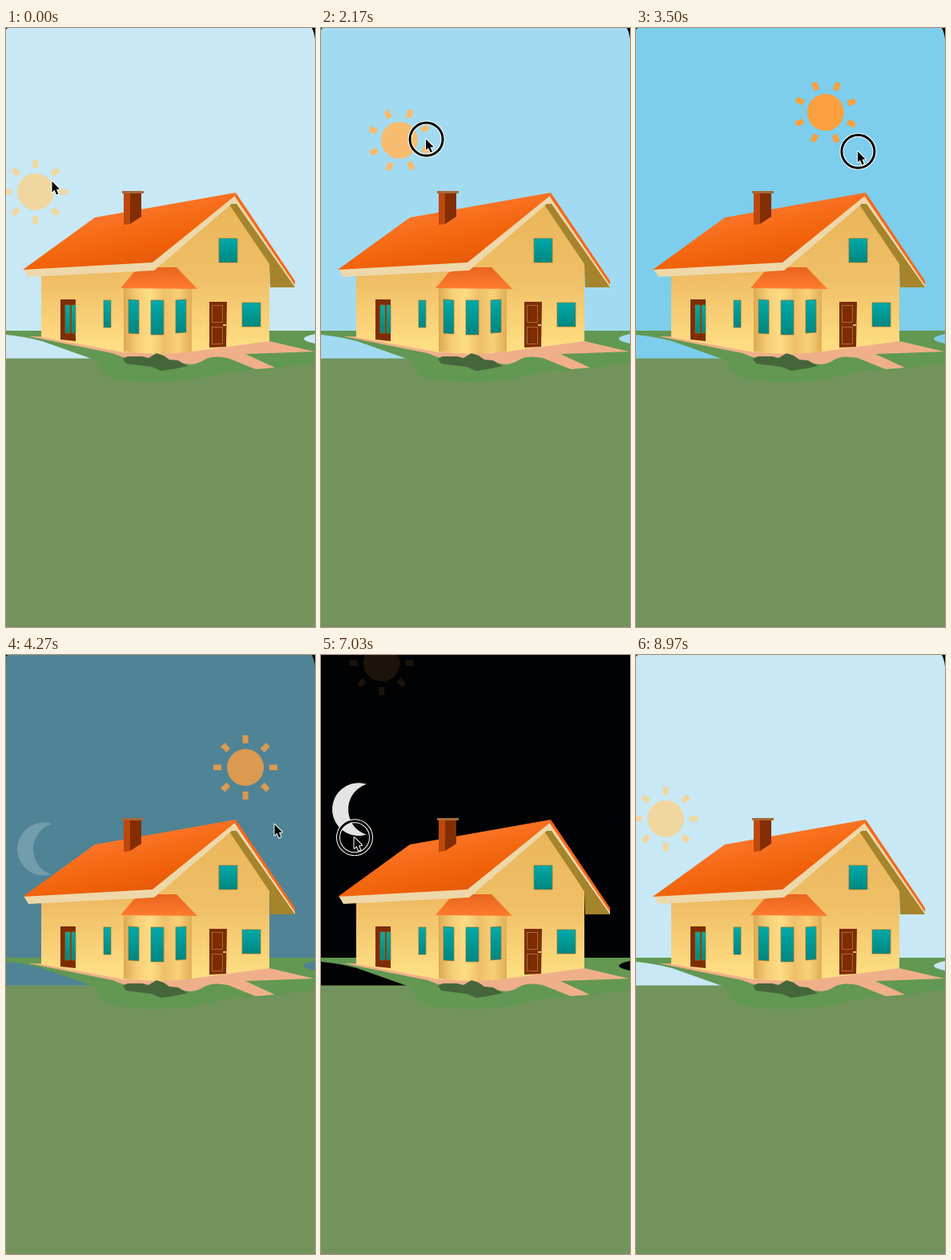
Write an HTML page with a canvas that moves like this. It is 386 by 746 pixels and loops after 9010 ms.

```html
<!DOCTYPE html>
<html lang="en">
<head>
<meta charset="utf-8">
<title>Day and night</title>
<style>
html, body { margin: 0; width: 100%; height: 100%; overflow: hidden; background: #000; }
canvas { display: block; width: 100%; height: 100%; }
</style>
</head>
<body>
<canvas id="stage" width="386" height="746"></canvas>
<script>
const W = 386, H = 746, LOOP = 9010;
const SKY_PALE = [200, 232, 245], SKY_BLUE = [124, 206, 236];
const SUN_PALE = [240, 215, 160], SUN_WARM = [254, 160, 64];
const ctx = document.getElementById('stage').getContext('2d');

const clamp = v => Math.min(1, Math.max(0, v));
const span = (t, a, b) => clamp((t - a) / (b - a));
const smooth = u => u * u * (3 - 2 * u);
const mix = (a, b, u) => a.map((v, i) => v + (b[i] - v) * u);
const rgb = c => `rgb(${c.map(Math.round).join(',')})`;

function trace(g, pts) {
  g.beginPath();
  for (let i = 0; i < pts.length; i += 2) g.lineTo(pts[i], pts[i + 1]);
  g.closePath();
}

function poly(g, fill, ...pts) {
  trace(g, pts);
  g.fillStyle = fill;
  g.fill();
}

function disc(g, x, y, r) {
  g.beginPath();
  g.arc(x, y, r, 0, 2 * Math.PI);
}

function grad(g, x0, y0, x1, y1, ...colors) {
  const f = g.createLinearGradient(x0, y0, x1, y1);
  colors.forEach((c, i) => f.addColorStop(i / (colors.length - 1), c));
  return f;
}

// A window whose right edge is shifted down by skew
function pane(g, x, y, w, h, skew = 0) {
  poly(g, grad(g, 0, y, 0, y + h, '#00aaa9', '#008680'),
    x, y, x + w, y + skew, x + w, y + h + skew, x, y + h);
  g.lineWidth = 0.7;
  g.strokeStyle = '#8b762e';
  g.stroke();
}

function drawGround(g) {
  g.fillStyle = '#72945c';
  g.fillRect(0, 411.5, W, H);

  g.fillStyle = '#629852';
  g.beginPath();
  g.moveTo(0, 377);
  g.lineTo(W, 377);
  g.lineTo(W, 381);
  g.quadraticCurveTo(358, 387, W, 393);
  g.lineTo(W, 417);
  g.quadraticCurveTo(350, 421, 322, 427);
  g.quadraticCurveTo(285, 424, 262, 432);
  g.quadraticCurveTo(200, 447, 135, 437);
  g.quadraticCurveTo(119, 433, 113, 414);
  g.lineTo(45, 390);
  g.quadraticCurveTo(22, 384, 0, 382);
  g.fill();

  g.fillStyle = '#efb089';
  g.beginPath();
  g.moveTo(28, 384);
  g.lineTo(329, 390);
  g.lineTo(385, 403);
  g.lineTo(299, 406);
  g.lineTo(336, 423);
  g.lineTo(312, 425);
  g.lineTo(277, 411);
  g.quadraticCurveTo(258, 407, 248, 413);
  g.quadraticCurveTo(236, 421, 224, 418);
  g.lineTo(146, 410);
  g.lineTo(133, 405);
  g.fill();
}

function drawWalls(g) {
  poly(g, grad(g, 0, 300, 0, 395, '#edb961', '#ffdd83'),
    44, 305, 190, 294, 190, 405, 147, 404, 44, 385);
  poly(g, grad(g, 0, 222, 0, 400, '#eab65b', '#efbf66', '#ffde82'),
    185, 300, 281, 219, 329, 294, 329, 390, 232, 403, 185, 405);

  g.fillStyle = grad(g, 147, 0, 232, 0, '#dca951', '#f6ce77', '#ffdc85', '#efbf69', '#f8d078', '#e0ae57');
  g.beginPath();
  g.moveTo(147, 322);
  g.lineTo(232, 322);
  g.lineTo(232, 403);
  g.quadraticCurveTo(191, 409, 147, 403);
  g.fill();
  poly(g, grad(g, 190, 298, 190, 325, '#e8651e', '#ff7b2d'),
    160, 304, 190, 298, 213, 298, 239, 325, 143, 324);
}

function drawRoof(g) {
  poly(g, '#a5842b', 279, 220, 288, 216, 361, 320, 361, 323, 330, 323, 329, 294);
  poly(g, '#eed8aa', 22, 300, 183, 291, 286, 208, 361, 317, 361, 323, 288, 219, 282, 219, 185, 302, 28, 310);
  poly(g, '#f8671a', 287, 205, 361, 315, 361, 320, 286, 210);
  poly(g, grad(g, 185, 220, 202, 294, '#fb7429', '#f56a14', '#f06008', '#e2590e'),
    111, 236, 287, 205, 286, 209, 183, 292, 21, 301);
  poly(g, '#be480b', 147, 205, 156, 205, 156, 244, 147, 245);
  poly(g, '#822e02', 155, 205, 169, 205, 169, 235, 155, 244);
  poly(g, '#a5693c', 145, 203, 172, 203, 172, 206, 145, 206);
}

function drawOpenings(g) {
  pane(g, 266, 262, 23, 30);
  pane(g, 295, 342, 23, 30);
  pane(g, 122, 339, 9, 34);
  pane(g, 153, 338, 13, 42, 1);
  pane(g, 181, 339, 16, 43);
  pane(g, 212, 339, 13, 41, -1);

  poly(g, '#7d2d00', 68, 338, 87, 338, 87, 390, 68, 388);
  pane(g, 74, 345, 6, 35);
  pane(g, 82, 345, 5, 35);

  poly(g, '#7d2d00', 254, 341, 276, 341, 275, 397, 254, 398);
  g.lineWidth = 0.8;
  g.strokeStyle = '#b7793c';
  for (const y of [345.5, 372.5]) g.strokeRect(257.5, y, 13, 21);
  g.fillStyle = '#e4b477';
  g.fillRect(271, 369, 4, 2);
}

function drawBush(g) {
  poly(g, '#45663a', 146, 412, 152, 409, 170, 409, 178, 411, 188, 405, 197, 408,
    204, 413, 215, 414, 227, 421, 213, 424, 194, 427, 182, 422, 150, 418);
}

function drawCorners(g) {
  poly(g, '#000', 0, 0, 2, 0, 0, 2);
  g.beginPath();
  g.moveTo(382, 0);
  g.quadraticCurveTo(385, 5, W, 14);
  g.lineTo(W, 0);
  g.fill();
}

const still = document.createElement('canvas');
still.width = W;
still.height = H;
for (const draw of [drawGround, drawWalls, drawRoof, drawOpenings, drawBush, drawCorners]) {
  draw(still.getContext('2d'));
}

// Sun's way along its arc: 1 is where the pointer lets go
const sunWay = t => 1.25 * Math.sin(span(t, 1640, 6095) * Math.PI / 2);
const arc = s => [37 + 262 * s, 204 - 341 * s + 277 * s * s];

// warm: pale to full colour; night: share of the moon against the sun
function skyState(t) {
  if (t < 6100) {
    const s = sunWay(t), [x, y] = arc(s);
    return { x, y, turn: s * Math.PI / 2, warm: clamp(s / 0.47), night: span(s, 0.82, 1.22) ** 2 };
  }
  const q = smooth(span(t, 6500, 8380)), rest = 1 - q;
  return {
    x: 37 + 48 * rest, y: 204 - 241 * rest, turn: 0,
    warm: clamp(rest / 0.4), night: 1 - clamp(q / 0.6) ** 2
  };
}

function pointer(t) {
  if (t < 1640) return mix([58, 191], [61, 181], smooth(span(t, 0, 1500)));
  if (t < 5760) {
    const s = Math.min(1, sunWay(t)), [x, y] = arc(s);
    const held = [x + 24 + 50 * s - 37 * s * s, y - 23 + 94 * s];
    return mix(held, [335, 204], smooth(span(t, 4270, 5000)));
  }
  const [x, y] = mix([335, 204], [42, 187], smooth(span(t, 5760, 6400)));
  return [x, y + 234 * span(t, 6500, 7780) ** 2];
}

const pressed = t => (t > 1400 && t < 4180) || (t > 6420 && t < 7840);

function drawSun({ x, y, turn, warm, night }) {
  ctx.save();
  ctx.translate(x, y);
  ctx.rotate(turn);
  ctx.globalAlpha = 1 - night;
  ctx.fillStyle = rgb(mix(SUN_PALE, SUN_WARM, warm));
  disc(ctx, 0, 0, 23);
  ctx.fill();
  for (let i = 0; i < 8; i++) {
    ctx.fillRect(-3.5, -40, 7, 10);
    ctx.rotate(Math.PI / 4);
  }
  ctx.restore();
}

function drawMoon(night) {
  const y = 164 + 87 * Math.sqrt(1 - night), tip = Math.acos(10 / 33);
  ctx.globalAlpha = night;
  ctx.fillStyle = '#fff';
  ctx.beginPath();
  ctx.arc(47, y, 33, tip, 2 * Math.PI - tip);
  ctx.arc(67, y, 33, Math.PI + tip, Math.PI - tip, true);
  ctx.fill();
  ctx.globalAlpha = 1;
}

function outline(width, color) {
  ctx.lineWidth = width;
  ctx.strokeStyle = color;
  ctx.stroke();
}

function drawPointer(t) {
  if (t > 8800) return;
  ctx.save();
  ctx.translate(...pointer(t));
  if (pressed(t)) {
    disc(ctx, 0, 0, 20.5);
    outline(5, '#fff');
    outline(3, '#000');
  }
  trace(ctx, [-0.5, 0, -0.5, 13.5, 2.5, 10.7, 5, 16.5, 7.4, 15.5, 5, 9.9, 9, 9.5]);
  ctx.lineJoin = 'round';
  outline(2, '#fff');
  ctx.fillStyle = '#000';
  ctx.fill();
  ctx.restore();
}

function frame(now) {
  const t = now % LOOP, state = skyState(t);
  const light = (1 - state.night) ** 2;
  ctx.fillStyle = rgb(mix(SKY_PALE, SKY_BLUE, state.warm).map(v => v * light));
  ctx.fillRect(0, 0, W, H);
  drawSun(state);
  drawMoon(state.night);
  ctx.drawImage(still, 0, 0);
  drawPointer(t);
  requestAnimationFrame(frame);
}
frame(0);
</script>
</body>
</html>
```
